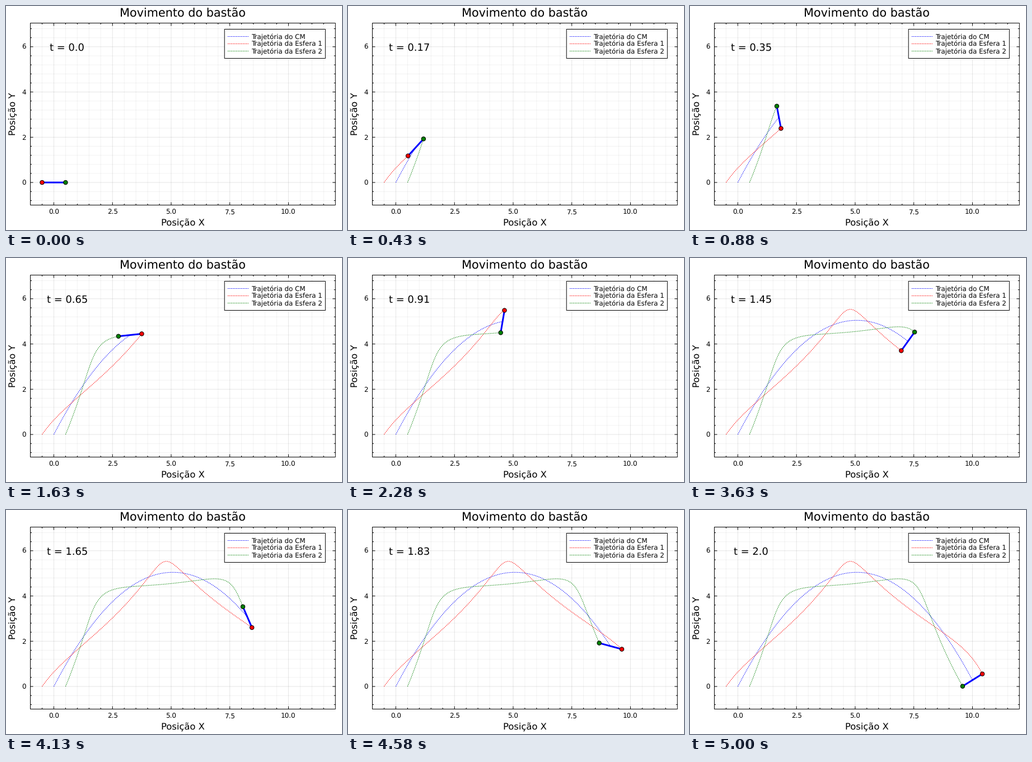
A matplotlib script that plays this animation: 600 by 400 pixels, repeating every 5.02 s.

```python
import numpy as np
import matplotlib.pyplot as plt
from matplotlib.animation import FuncAnimation
from matplotlib.collections import LineCollection
from matplotlib.patches import Circle, Rectangle

plt.rcParams.update({"font.family": "DejaVu Sans", "text.hinting": "none"})

W, H, DPI = 600, 400, 100
PX = 72 / DPI  # points per pixel
FONT = 1.485   # pixels per nominal font point
LEFT, RIGHT, TOP, BOTTOM = 43.5, 588.2, 30.5, 355.5

# Thrown rod: semi-implicit Euler for the centre, uniform spin
DT, STEPS = 0.01, 200
VX, VY, G, OMEGA, HALF = 5.0, 10.0, 9.81, 5.0, 0.5
t = np.arange(STEPS + 1) * DT
cx, cy = VX * t, VY * t - G * t * (t + DT) / 2
dx, dy = HALF * np.cos(OMEGA * t), HALF * np.sin(OMEGA * t)

X0, X1 = -1, 12
Y0, Y1 = -1, cy.max() + 2


def sx(x):
    return LEFT + (x - X0) / (X1 - X0) * (RIGHT - LEFT)


def sy(y):
    return BOTTOM - (y - Y0) / (Y1 - Y0) * (BOTTOM - TOP)


fig = plt.figure(figsize=(W / DPI, H / DPI), dpi=DPI, facecolor="white")
ax = fig.add_axes([0, 0, 1, 1])
ax.set(xlim=(0, W), ylim=(H, 0))
ax.set_axis_off()


def label(x, y, s, size, ha="center", **kw):
    return ax.text(x, y, s, fontsize=size * FONT * PX, ha=ha, va="baseline", **kw)


def lines(segments, color, z):
    ax.add_collection(LineCollection(segments, colors=color, linewidths=PX,
                                     snap=False, zorder=z), autolim=False)


def box(x0, y0, x1, y1, z, fill="none"):
    ax.add_patch(Rectangle((x0, y0), x1 - x0, y1 - y0, fc=fill, ec="black",
                           lw=PX, snap=False, zorder=z))


def dotted(color, z, x=(), y=()):
    return ax.plot(x, y, color=color, lw=PX, ls=(0, (1.5, 1.5)),
                   dash_capstyle="butt", snap=False, zorder=z)[0]


# Grid and inward ticks, five minor steps per major one
grid = {True: [], False: []}
ticks = []
for i in range(-1, 24):
    x, major = sx(i * 0.5), i % 5 == 0
    n = 5 if major else 2.5
    grid[major].append([(x, TOP), (x, BOTTOM)])
    ticks += [[(x, BOTTOM), (x, BOTTOM - n)], [(x, TOP), (x, TOP + n)]]
    if major:
        label(x, 371.5, f"{i * 0.5:.1f}", 8)
for i in range(-2, 18):
    y, major = sy(i * 0.4), i % 5 == 0
    n = 5 if major else 2.5
    grid[major].append([(LEFT, y), (RIGHT, y)])
    ticks += [[(LEFT, y), (LEFT + n, y)], [(RIGHT, y), (RIGHT - n, y)]]
    if major:
        label(35.5, y + 4.5, f"{i * 0.4:.0f}", 8, ha="right")
lines(grid[False], (0, 0, 0, 0.05), 0)
lines(grid[True], (0, 0, 0, 0.1), 0)
lines(ticks, "black", 1)
box(LEFT, TOP, RIGHT, BOTTOM, 1)

mid = (LEFT + RIGHT) / 2
label(mid, 18.5, "Movimento do bastão", 14)
label(mid, 392, "Posição X", 11)
label(16.5, (TOP + BOTTOM) / 2, "Posição Y", 11, rotation=90,
      rotation_mode="anchor")

# Legend
box(390.2, 41.5, 570.3, 93.5, 6, "white")
names = ("do CM", "blue"), ("da Esfera 1", "red"), ("da Esfera 2", "green")
for i, (name, color) in enumerate(names):
    y = 54.5 + 13 * i
    dotted(color, 7, (396, 433), (y, y))
    label(438, y + 4.5, "Trajetória " + name, 8, ha="left", zorder=7)

paths = [(sx(cx + s * dx), sy(cy + s * dy)) for s in (0, -1, 1)]
trails = [dotted(color, 2) for _, color in names]
rod, = ax.plot([], [], color="blue", lw=3 * PX, solid_capstyle="butt",
               snap=False, zorder=3)
balls = [ax.add_patch(Circle((0, 0), 3.7, fc=color, ec="black", lw=PX, zorder=4))
         for color in ("red", "green")]
clock = label(109.2, 79.6, "", 12, zorder=5)

INTERVAL, FRAMES = 10, 502
STEP_MS = 25


def update(i):
    k = i * INTERVAL // STEP_MS
    for trail, (x, y) in zip(trails, paths):
        trail.set_data(x[:k + 1], y[:k + 1])
    ends = [(x[k], y[k]) for x, y in paths[1:]]
    rod.set_data(*zip(*ends))
    for ball, end in zip(balls, ends):
        ball.center = end
    clock.set_text(f"t = {k / 100}")
    return [*trails, rod, *balls, clock]


anim = FuncAnimation(fig, update, frames=FRAMES, interval=INTERVAL,
                     repeat=True, repeat_delay=0, blit=False)
plt.show()
```
